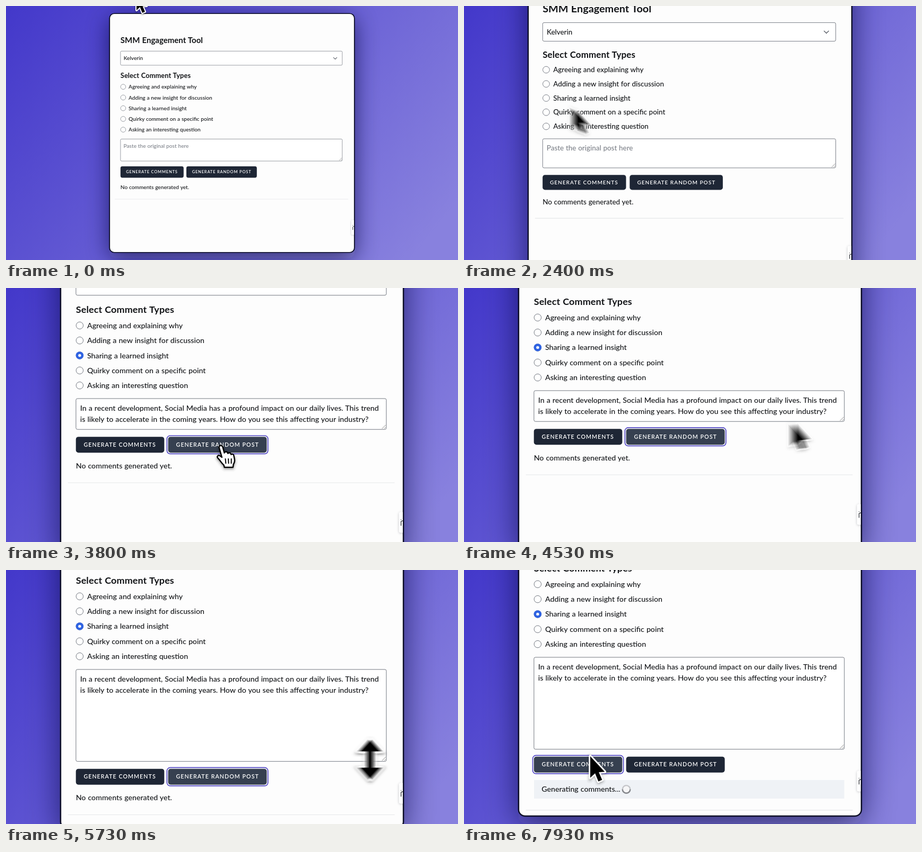
These frames come from a looping animation (852 px wide and 480 px high, 8000 ms). An HTML page:

```html
<!DOCTYPE html>
<html lang="en">
<head>
<meta charset="utf-8">
<title>SMM Engagement Tool</title>
<style>
html, body { margin: 0; width: 100%; height: 100%; overflow: hidden; background: #4338ca; }
svg { display: block; width: 100vw; height: 100vh; }
text { font: 500 10.15px Lato, "Open Sans", sans-serif; fill: #121417; word-spacing: .03em; }
.title { font-size: 15px; font-weight: 700; }
.sub { font-size: 12.8px; font-weight: 700; letter-spacing: .008em; }
.btn text { font-size: 7.6px; font-weight: 600; letter-spacing: .1em; word-spacing: 0; fill: #fff; }
.hint { fill: #7c8088; }
.field { fill: #fff; stroke: #6f747d; stroke-width: .7; }
.ring { fill: none; stroke: #5248c4; stroke-width: 1.2; }
#ghosts { isolation: isolate; }
#ghosts use { mix-blend-mode: plus-lighter; }
</style>
</head>
<body>
<svg viewBox="0 0 852 480" preserveAspectRatio="none">
  <defs>
    <linearGradient id="sky" gradientUnits="userSpaceOnUse" x1="0" y1="0" x2="700" y2="560">
      <stop offset="0" stop-color="#4338ca"/>
      <stop offset="1" stop-color="#8881de"/>
    </linearGradient>
    <filter id="soft" x="-30%" y="-30%" width="160%" height="160%"><feGaussianBlur stdDeviation="22"/></filter>
    <filter id="haze" x="-100%" y="-50%" width="300%" height="200%"><feGaussianBlur stdDeviation="1.6"/></filter>
    <clipPath id="pane"><rect x="196" y="15" width="460" height="450" rx="8"/></clipPath>

    <path id="arrowShape" d="M0 0V29L6.5 23L11 34L16 31.8L11.5 21.5L19.5 21Z"/>
    <path id="handShape" d="M-2.5 2q0-2.5 2.3-2.5q2 0 2.6 2l2.2 8c.5-2 4-2 4.5 0l.3.8c.8-1.5 3.6-1.2 4 .6l.3.8c1-1.2 3.2-.6 3.6 1.2l1 5c.6 3-.3 5-1.5 7l-.6 4h-11.5l-.8-3c-3-2.5-5-6.5-8-9.5c-1.8-2 .3-4.6 2.8-3l2.6 2z"/>
    <path id="resizeShape" d="M0-27L14.5-11H4.2V11H14.5L0 27L-14.5 11H-4.2V-11H-14.5Z"/>

    <g id="arrow">
      <use href="#arrowShape" y="1.5" opacity=".4" stroke="#000" stroke-width="3" filter="url(#haze)"/>
      <use href="#arrowShape" fill="#000" stroke="#fff" stroke-width="4" stroke-linejoin="round" style="paint-order:stroke"/>
    </g>
    <g id="hand">
      <use href="#handShape" y="1.5" opacity=".4" stroke="#000" stroke-width="2" filter="url(#haze)"/>
      <use href="#handShape" fill="#fff" stroke="#000" stroke-width="1.7" stroke-linejoin="round"/>
      <path d="M6 17.5l.6 6M10 17.5l.3 6M14 17.5l-.1 6" fill="none" stroke="#000" stroke-width="1.4" stroke-linecap="round"/>
    </g>
    <g id="resize">
      <use href="#resizeShape" y="1.5" opacity=".45" stroke="#000" stroke-width="5" filter="url(#haze)"/>
      <use href="#resizeShape" fill="#000" stroke="#fff" stroke-width="5.5" stroke-linejoin="round" style="paint-order:stroke"/>
    </g>
  </defs>

  <rect width="852" height="480" fill="url(#sky)"/>
  <g id="world">
    <rect x="195" y="24" width="462" height="452" rx="10" fill="#0c0a3a" opacity=".66" filter="url(#soft)"/>
    <rect x="194.3" y="13.4" width="463.4" height="453.2" rx="9.8" fill="#0d0e26"/>
    <rect x="196.1" y="15.1" width="459.8" height="449.8" rx="8" fill="#fdfdfd"/>
    <g clip-path="url(#pane)">
      <text class="title" x="215.8" y="70.4">SMM Engagement Tool</text>
      <rect class="field" x="215.9" y="85.3" width="417.9" height="26.6" rx="2"/>
      <text x="221.7" y="102.4">Kelverin</text>
      <path d="M617.3 97.3l3.2 3.2l3.2-3.2" fill="none" stroke="#5f646d" stroke-width="1.1" stroke-linecap="round"/>
      <text class="sub" x="215.8" y="135.8">Select Comment Types</text>
      <g id="options"></g>
      <rect id="area" class="field" x="215.9" y="251.4" width="417.9" height="41.6" rx="2"/>
      <text id="hint" class="hint" x="221.6" y="268">Paste the original post here</text>
      <g id="post">
        <text x="221.6" y="268">In a recent development, Social Media has a profound impact on our daily lives. This trend</text>
        <text x="221.6" y="283.2">is likely to accelerate in the coming years. How do you see this affecting your industry?</text>
      </g>
      <g id="below">
        <path d="M628 292l5-5M631 292l2-2" stroke="#777" stroke-width=".6"/>
        <g class="btn" id="commentsBtn">
          <rect class="ring" x="214.2" y="301.4" width="122.2" height="24.6" rx="4.4"/>
          <rect class="face" x="215.8" y="303" width="119" height="21.4" rx="3.4"/>
          <text x="226.3" y="316.3">GENERATE COMMENTS</text>
        </g>
        <g class="btn" id="randomBtn">
          <rect class="ring" x="338.4" y="301.4" width="136" height="24.6" rx="4.4"/>
          <rect class="face" x="340" y="303" width="132.8" height="21.4" rx="3.4"/>
          <text x="350.7" y="316.3">GENERATE RANDOM POST</text>
        </g>
        <text id="empty" x="215.8" y="345.6">No comments generated yet.</text>
        <g id="busy">
          <rect x="216" y="334.6" width="417.7" height="25" fill="#eff2f6"/>
          <text x="226.2" y="350.5">Generating comments...</text>
          <g id="spinner" fill="none" stroke-width="1.7">
            <circle r="5.2" fill="#f6f6f7" stroke="#c4c5c9"/>
            <path d="M5.2 0A5.2 5.2 0 0 1-5.2 0" stroke="#85878c"/>
          </g>
        </g>
        <path id="rule" d="M205 365H645" stroke="#e6e7ea" stroke-width=".8"/>
      </g>
      <rect x="650.4" y="405" width="14" height="28.5" rx="3" fill="#8a8d94" opacity=".4" filter="url(#haze)"/>
      <rect x="650.8" y="404.5" width="14" height="28" rx="2.5" fill="#fff"/>
      <path d="M653.6 423v-5.5q.8-1.2 2.4-1M653.6 415v-.8" fill="none" stroke="#3a3d42" stroke-width="1"/>
    </g>
    <g id="ghosts"></g>
  </g>
</svg>
<script>
const LOOP = 8000, FPS = 15, GHOSTS = 8, SHUTTER = 36;
const DRAG_TOP = 291, DRAG_MAX = 82.5;
const PICK = 2690, POST = 3720, DRAG_END = 5520, SEND = 7180;

const $ = id => document.getElementById(id);
const clamp = (v, a, b) => Math.min(b, Math.max(a, v));
const show = (el, on) => el.setAttribute('visibility', on ? 'visible' : 'hidden');

function svg(tag, attrs, parent) {
  const el = document.createElementNS('http://www.w3.org/2000/svg', tag);
  for (const k in attrs) el.setAttribute(k, attrs[k]);
  return parent.appendChild(el);
}

// Monotone cubic through [time, value] points: smooth, never overshoots.
function curve(pts) {
  const n = pts.length;
  const slope = i => (pts[i + 1][1] - pts[i][1]) / (pts[i + 1][0] - pts[i][0]);
  const tangent = pts.map((p, i) => {
    if (i === 0 || i === n - 1) return 0;
    const a = slope(i - 1), b = slope(i);
    return a * b <= 0 ? 0 : 2 * a * b / (a + b);
  });
  return t => {
    if (t <= pts[0][0]) return pts[0][1];
    if (t >= pts[n - 1][0]) return pts[n - 1][1];
    let i = 0;
    while (t > pts[i + 1][0]) i++;
    const h = pts[i + 1][0] - pts[i][0], u = (t - pts[i][0]) / h, v = 1 - u;
    return pts[i][1] * v * v * (1 + 2 * u) + pts[i + 1][1] * u * u * (3 - 2 * u)
      + h * u * v * (v * tangent[i] - u * tangent[i + 1]);
  };
}

// Pointer stops: time, x, y
const stops = [
  [60, 246, -21], [270, 250, -48], [1000, 330, -48], [1800, 380, 244], [1960, 383, 254],
  [2600, 223, 195], [2740, 223, 195], [3020, 250.5, 228], [3120, 250.5, 228],
  [3570, 408, 314], [4150, 415, 316],
  [4533, 564.6, 296.4], [4780, 630, DRAG_TOP], [4900, 630, DRAG_TOP],
  [DRAG_END, 630, DRAG_TOP + DRAG_MAX], [5600, 628, 373.2], [5733, 612.2, 373], [6500, 267, 398.5],
  [6800, 269.6, 399], [7250, 271, 398.5], [7933, 291.7, 385], [8000, 292, 384.5]
];
const px = curve(stops.map(s => [s[0], s[1]]));
const py = curve(stops.map(s => [s[0], s[2]]));
const focusY = curve([[1850, 250], [2700, 256], [3067, 268], [3700, 350], [4533, 395],
  [5733, 410], [6300, 446], [6800, 466], [7933, 467.5]]);

function zoom(t) {
  const k = Math.max(0, t - 1850) * .0055;
  return 1 + .4 * (1 - (1 + k) * Math.exp(-k));
}

function pointerKind(t) {
  if (t > 4720 && t < 5900) return 'resize';
  if (t > 3480 && t < 4300 || t > 6380 && t < 7420) return 'hand';
  return 'arrow';
}

const labels = ['Agreeing and explaining why', 'Adding a new insight for discussion',
  'Sharing a learned insight', 'Quirky comment on a specific point', 'Asking an interesting question'];
labels.forEach((label, i) => {
  const y = 152.7 + i * 20.24, box = $('options');
  svg('circle', { cx: 220.9, cy: y, r: 4.8, class: 'field' }, box);
  svg('text', { x: 231, y: y + 3.6 }, box).textContent = label;
});
const picked = svg('g', { transform: 'translate(220.9 193.18)' }, $('options'));
const pickRing = svg('circle', { r: 6.6, fill: '#dfe6fb', stroke: '#2f55c8', 'stroke-width': 1.3 }, picked);
svg('circle', { r: 5.2, fill: '#2f63e2' }, picked);
svg('circle', { r: 1.9, fill: '#fff' }, picked);

const ghosts = Array.from({ length: GHOSTS }, () => svg('use', { opacity: 1 / GHOSTS }, $('ghosts')));

function paintButton(id, focused, hovered) {
  const btn = $(id);
  show(btn.querySelector('.ring'), focused);
  btn.querySelector('.face').setAttribute('fill', focused || hovered ? '#364050' : '#1e2635');
}

function draw(t) {
  const s = zoom(t);
  $('world').setAttribute('transform',
    `translate(${426 * (1 - s)} ${focusY(t) * (1 - s)}) scale(${s})`);

  show(picked, t >= PICK);
  show(pickRing, t >= PICK && t < POST);
  show($('hint'), t < POST);
  show($('post'), t >= POST);

  const grow = t < 4900 ? 0 : t < DRAG_END ? clamp(py(t) - DRAG_TOP, 0, DRAG_MAX) : DRAG_MAX;
  $('area').setAttribute('height', 41.6 + grow);
  $('below').setAttribute('transform', `translate(0 ${grow})`);

  const sent = t >= SEND;
  paintButton('commentsBtn', sent, t > 6380);
  paintButton('randomBtn', t >= POST && !sent, t > 3480 && t < POST);
  show($('empty'), !sent);
  show($('busy'), sent);
  $('spinner').setAttribute('transform', `translate(340.3 347.1) rotate(${(t - 7933) * .36})`);
  $('rule').setAttribute('transform', `translate(0 ${sent ? 10.3 : 0})`);

  // Average several moments around t for motion blur.
  const kind = pointerKind(t);
  ghosts.forEach((g, i) => {
    const m = t + SHUTTER * (i / (GHOSTS - 1) - .5);
    g.setAttribute('href', '#' + kind);
    g.setAttribute('transform', `translate(${px(m)} ${py(m)})`);
  });
}

const start = performance.now();
function tick() {
  const t = (performance.now() - start) % LOOP;
  draw(Math.floor((t + 4) * FPS / 1000) * 1000 / FPS);
  requestAnimationFrame(tick);
}
tick();
</script>
</body>
</html>
```
